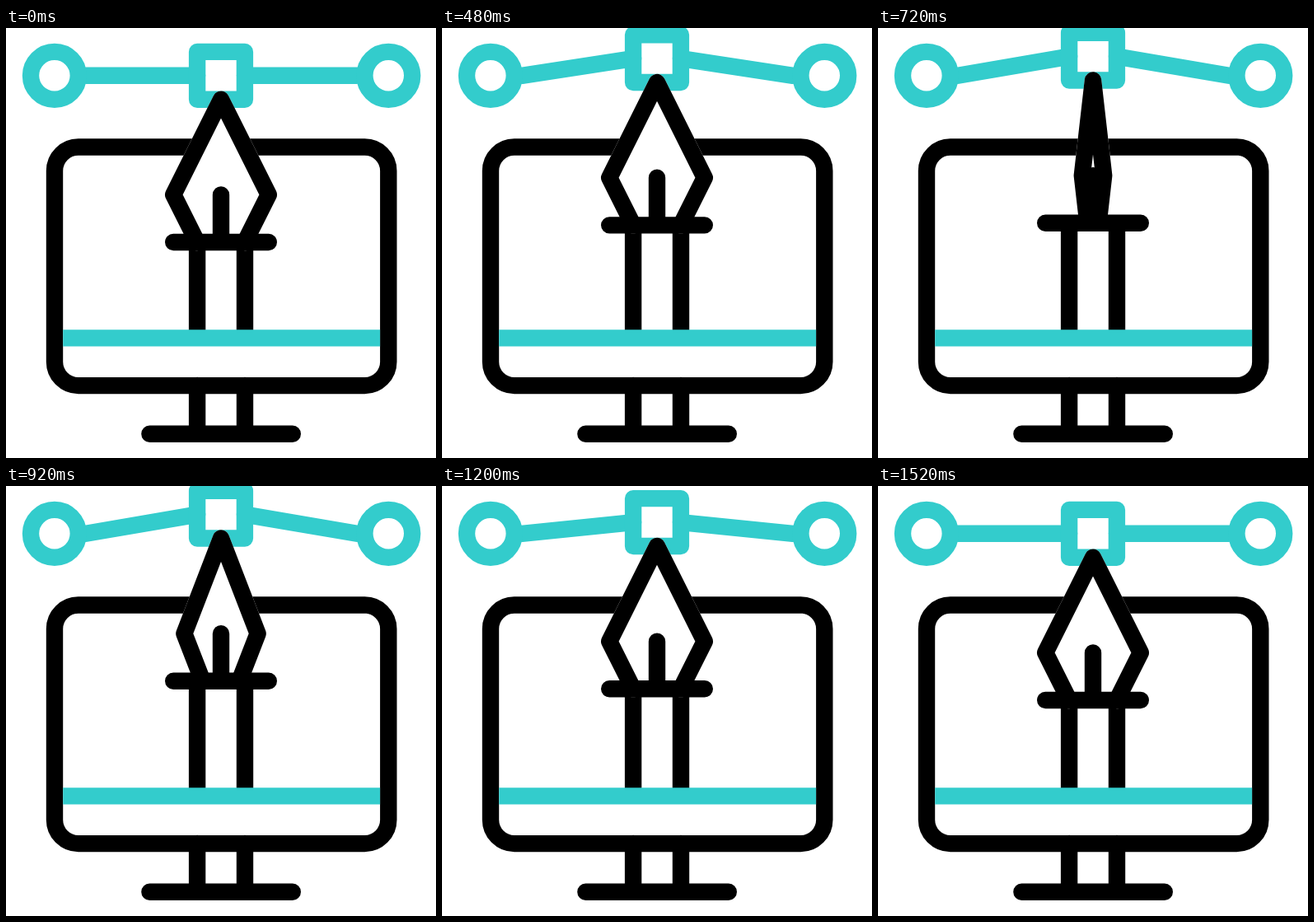
An HTML page that plays this animation: 522x522 px, repeating every 2 s.

```html
<!DOCTYPE html>
<html lang="en">
<head>
<meta charset="utf-8">
<title>Pen tool on a monitor</title>
<style>
  html, body { margin: 0; width: 100%; height: 100%; overflow: hidden; background: #fff; }
  svg { display: block; width: 100%; height: 100%; }
  .teal { stroke: #33cccc; }
  .black { stroke: #000; }
</style>
</head>
<body>
<svg viewBox="0 0 522 522" fill="none" stroke-width="20.4" stroke-linecap="round" stroke-linejoin="round">
  <g class="teal">
    <path id="handles"/>
    <rect id="anchor" x="232.1" y="28.9" width="57.8" height="57.8"/>
    <circle cx="58.9" cy="57.8" r="28.9"/>
    <circle cx="464.3" cy="57.8" r="28.9"/>
  </g>
  <g class="black">
    <rect x="59" y="144.5" width="405.3" height="289.6" rx="28.9"/>
    <path d="M232.1 434V492.7M290 434V492.7M174.4 492.7H347.8"/>
    <path id="shaft" stroke-linecap="butt"/>
  </g>
  <path class="teal" stroke-linecap="butt" d="M69.2 376.4H454.1"/>
  <g id="pen">
    <path id="mask" fill="#fff" stroke="#fff"/>
    <path id="nib" class="black"/>
    <path class="black" d="M261 202.4V260M203.2 260H318.8"/>
  </g>
</svg>
<script>
const LOOP = 2000, STEP = 40, LIFT = 23.2, CENTER = 261;
const el = id => document.getElementById(id);

// Cubic ease in and out, from 0 to 1 over the given span.
function ease(time, start, duration) {
  const u = Math.min(1, Math.max(0, (time - start) / duration));
  return u < 0.5 ? 4 * u ** 3 : 1 - 4 * (1 - u) ** 3;
}

function draw(time) {
  const rise = LIFT * (ease(time, 117, 520) - ease(time, 957, 520));
  const spread = 1 - ease(time, 597, 200) + ease(time, 797, 200);
  const knot = 57.8 - rise;
  const wide = 57.8 * spread, narrow = 28.9 * spread;
  const outline = `M${CENTER - narrow} 260L${CENTER - wide} 202.4L${CENTER} 86.7` +
    `L${CENTER + wide} 202.4L${CENTER + narrow} 260`;
  const shift = `translate(0 ${-rise})`;

  el("handles").setAttribute("d", `M97 57.8L232.1 ${knot}M426 57.8L290 ${knot}`);
  el("anchor").setAttribute("transform", shift);
  el("pen").setAttribute("transform", shift);
  el("mask").setAttribute("d", outline);
  el("nib").setAttribute("d", outline);
  el("shaft").setAttribute("d", `M232.1 ${260 - rise}V376M290 ${260 - rise}V376`);
}

function tick() {
  draw(Math.floor(performance.now() % LOOP / STEP) * STEP);
  requestAnimationFrame(tick);
}
tick();
</script>
</body>
</html>
```
